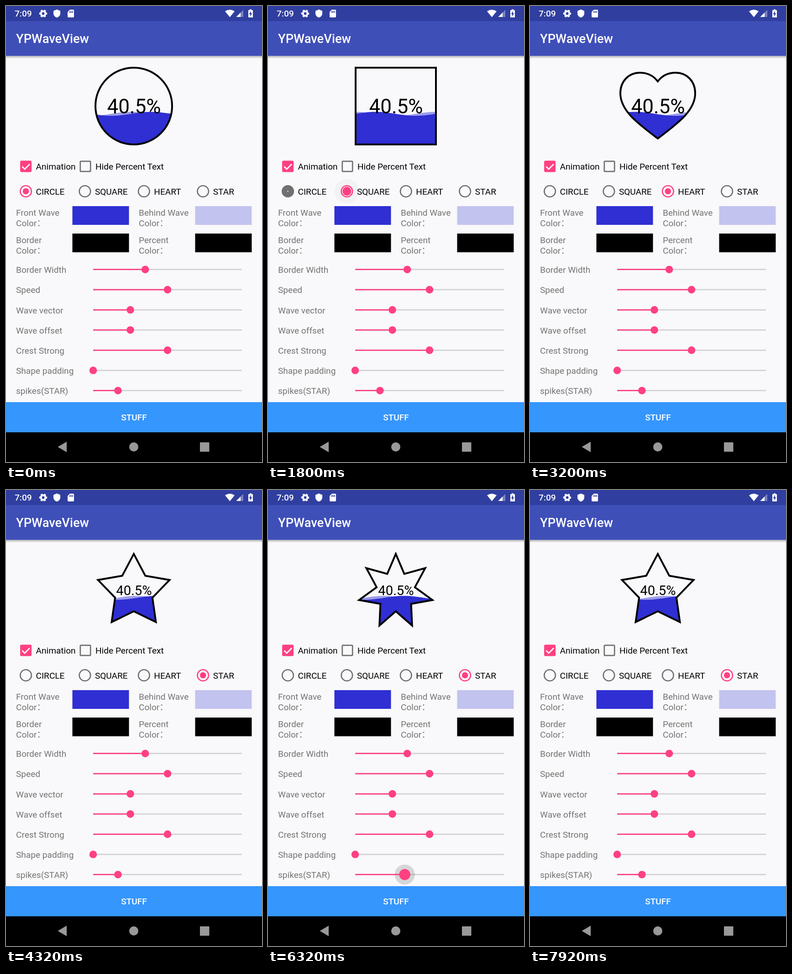
These frames come from a looping animation (561 by 998 pixels, 8000 ms). An HTML page:

```html
<!DOCTYPE html>
<html lang="zh-CN">
<head>
<meta charset="utf-8">
<title>YPWaveView</title>
<style>
  html, body { margin: 0; width: 100%; height: 100%; overflow: hidden; background: #f9f9fb; }
  svg { display: block; width: 100%; height: 100%; }
  text { font: 19.1px Roboto, "Noto Sans CJK SC", "Noto Sans CJK", sans-serif; }
  .medium { font-weight: 500; fill: #fff; }
  .label { fill: #747474; }
</style>
</head>
<body>
<svg id="stage" viewBox="0 0 561 998">
  <defs>
    <linearGradient id="shadow" x2="0" y2="1">
      <stop stop-opacity=".3"/><stop offset="1" stop-opacity="0"/>
    </linearGradient>
    <clipPath id="clip"><path id="clipShape"/></clipPath>
  </defs>

  <rect y="109" width="561" height="6" fill="url(#shadow)"/>
  <rect y="33" width="561" height="76" fill="#3f4fb8"/>
  <rect width="561" height="33" fill="#303f9f"/>
  <text class="medium" x="19" y="23">7:09</text>
  <text class="medium" x="22" y="81" style="font-size:27.3px">YPWaveView</text>

  <g fill="#fff">
    <g fill="none" stroke="#fff">
      <circle cx="81.5" cy="16.5" r="4.9" stroke-width="4"/>
      <circle cx="81.5" cy="16.5" r="7.4" stroke-width="2.6" stroke-dasharray="4.2 3.55" stroke-dashoffset="2.1"/>
    </g>
    <path d="M111.500 7.500L119 10.800V16C119 20.500 116 24 111.500 25.200C107 24 104 20.500 104 16V10.800Z"/>
    <path fill-rule="evenodd" d="M140 8H147Q149 8 149 10V23Q149 25 147 25H137Q135 25 135 23V13ZM139 11V15H140.700V11ZM142 11V15H143.700V11ZM145 11V15H146.700V11Z"/>
    <path d="M480 11.500Q490.500 4.500 501 11.500L490.500 24.500Z"/>
    <path d="M520 8.500V24H504.500Z" opacity=".35"/>
    <path d="M514 14.500V24H504.500Z"/>
    <path fill-rule="evenodd" d="M534 9V7.300H538V9H541V25H531V9ZM537 11L532.700 18H535.200V23L539.300 16H537Z"/>
  </g>

  <g clip-path="url(#clip)">
    <path id="behind" fill="#9d9de9"/>
    <path id="front" fill="#2f2fd3"/>
  </g>
  <path id="border" fill="none" stroke="#000" stroke-width="4"/>
  <text id="percent" x="280.500" text-anchor="middle">40.5%</text>

  <rect x="31" y="338.500" width="25" height="25" rx="3" fill="#ff4081"/>
  <path d="M35.500 351.500L41 357L52 346" fill="none" stroke="#fff" stroke-width="2.700"/>
  <rect x="162.800" y="339.800" width="22.400" height="22.400" rx="1.500" fill="none" stroke="#707070" stroke-width="2.700"/>
  <text x="65.500" y="358">Animation</text>
  <text x="196" y="358">Hide Percent Text</text>

  <g id="controls"></g>

  <rect y="867" width="561" height="66" fill="#3596fd"/>
  <text class="medium" x="280.500" y="907" text-anchor="middle">STUFF</text>
  <rect y="933" width="561" height="65"/>
  <g fill="#999">
    <path d="M113.500 965L133 953.500V976.500Z"/>
    <circle cx="280" cy="965" r="10"/>
    <rect x="425" y="955" width="20.500" height="20.500" rx="1"/>
  </g>
  <circle id="halo" cy="841.700" r="22" fill="#000"/>
  <path id="spikeTrack" stroke="#ff4081" stroke-width="2.700"/>
  <circle id="spikeThumb" cy="841.700" fill="#ff4081"/>
</svg>

<script>
const PINK = '#ff4081', GRAY = '#707070';
const LOOP = 8000;
const $ = id => document.getElementById(id);
const clamp = x => Math.min(1, Math.max(0, x));
const smooth = x => x * x * (3 - 2 * x);

function add(tag, attrs, text = '') {
  const node = document.createElementNS('http://www.w3.org/2000/svg', tag);
  set(node, attrs);
  node.textContent = text;
  return $('controls').appendChild(node);
}
function set(node, attrs) {
  for (const key in attrs) node.setAttribute(key, attrs[key]);
}

// Colour swatches
[['Front Wave', 22, 438, '#2f2fd3'], ['Behind Wave', 291, 438, '#c3c3ef'],
 ['Border', 22, 498, '#000'], ['Percent', 291, 498, '#000']].forEach(([name, x, y, fill]) => {
  add('text', { class: 'label', x, y: y + 21 }, name);
  add('text', { class: 'label', x, y: y + 43.5 }, 'Color：');
  add('rect', { x: x + 123.5, y, width: 124, height: 41, fill });
});

// Sliders; the last one is drawn per frame
const TRACK_X = 191, TRACK_W = 326;
[['Border Width', .35], ['Speed', .5], ['Wave vector', .25], ['Wave offset', .25],
 ['Crest Strong', .5], ['Shape padding', 0], ['spikes(STAR)']].forEach(([name, value], i) => {
  const y = 576.7 + i * 44.17, x = TRACK_X + TRACK_W * value;
  add('text', { class: 'label', x: 22, y: y + 7.5 }, name);
  add('path', { d: `M${TRACK_X} ${y}h${TRACK_W}`, stroke: '#d2d2d2', 'stroke-width': 2.7 });
  if (value === undefined) return;
  add('path', { d: `M${TRACK_X} ${y}H${x}`, stroke: PINK, 'stroke-width': 2.7 });
  add('circle', { cx: x, cy: y, r: 8.3, fill: PINK });
});

// Radio buttons: each is selected from its tap until the next one
const TAPS = [-1000, 1570, 2730, 3720];
const radios = ['CIRCLE', 'SQUARE', 'HEART', 'STAR'].map((name, i) => {
  const cx = 43.5 + i * 129.4, cy = 405.5;
  add('text', { x: cx + 22, y: 412.5 }, name);
  return {
    ripple: add('circle', { cx, cy, r: 27 }),
    ring: add('circle', { cx, cy, fill: 'none' }),
    dot: add('circle', { cx, cy })
  };
});

function drawRadio({ ripple, ring, dot }, i, t) {
  const on = t >= TAPS[i] && !(t >= TAPS[i + 1]);
  const age = t - (on ? TAPS[i] : TAPS[i + 1] ?? Infinity);
  const fillUp = smooth(clamp(age / 170)), settle = clamp((age - 170) / 300);
  const OUTER = 13.6, HOLE = 10.9, DOT = 6.8;
  let hole = HOLE, radius = 0;
  if (on) {
    if (age < 170) hole = HOLE * (1 - fillUp);
    else radius = DOT + (HOLE - DOT) * (1 - settle) ** 1.6;
  } else if (age >= 0) {
    if (age < 170) radius = DOT + (HOLE - DOT) * fillUp;
    else hole = HOLE * smooth(settle);
  }
  const color = on ? PINK : GRAY;
  set(ring, { r: (OUTER + hole) / 2, 'stroke-width': OUTER - hole, stroke: color });
  set(dot, { r: radius, fill: color });
  set(ripple, { opacity: on ? .12 * clamp(1 - age / 300) : 0 });
}

// Spike count while the last slider is dragged: [time, spikes]
const DRAG = [[4680, 5], [5220, 9], [5400, 11], [5640, 14], [6000, 14], [6160, 11], [6320, 7], [6500, 5]];
function spikesAt(t) {
  const next = DRAG.findIndex(([time]) => time > t);
  if (next < 1) return 5;
  const [t0, a] = DRAG[next - 1], [t1, b] = DRAG[next];
  return Math.round(a + (b - a) * (t - t0) / (t1 - t0));
}

function starPath(spikes) {
  const points = Array.from({ length: spikes * 2 }, (_, i) => {
    const r = i % 2 ? 43 : 82.5, a = i * Math.PI / spikes;
    return `${280 + r * Math.sin(a)} ${222.4 - r * Math.cos(a)}`;
  });
  return `M${points.join('L')}Z`;
}

const SHAPES = [
  'M196 219A84 84 0 0 1 364 219A84 84 0 0 1 196 219Z',
  'M192 135H368V303H192Z',
  'M280 165C271 153 257 146 241 146C216 146 198 165 198 191C198 232 244 262 280 290' +
  'C316 262 362 232 362 191C362 165 344 146 319 146C303 146 289 153 280 165Z'
];

function wavePath(crest) {
  let d = 'M190 310';
  for (let x = 190; x <= 370; x += 2)
    d += `L${x} ${236 - 4.3 * Math.cos((x - crest) / 176 * 2 * Math.PI)}`;
  return d + 'L370 310Z';
}

function draw(t) {
  radios.forEach((radio, i) => drawRadio(radio, i, t));

  const selected = TAPS.filter(tap => tap <= t).length - 1;
  const star = selected === 3, spikes = spikesAt(t);
  const shape = star ? starPath(spikes) : SHAPES[selected];
  set($('clipShape'), { d: shape });
  set($('border'), { d: shape });
  set($('percent'), { y: star ? 229.5 : 234.5, style: `font-size:${star ? 29.2 : 44}px` });

  const crest = 318 + 176 * 1.406 * t / 1000;
  set($('front'), { d: wavePath(crest) });
  set($('behind'), { d: wavePath(crest - 44) });

  const x = TRACK_X + TRACK_W * (spikes - 3) / 12;
  const press = clamp((t - 4540) / 120) * clamp((7120 - t) / 120);
  set($('spikeTrack'), { d: `M${TRACK_X} 841.700H${x}` });
  set($('spikeThumb'), { cx: x, r: 8.3 + 3.9 * press });
  set($('halo'), { cx: x, opacity: .14 * press });
}

const start = performance.now();
function tick() {
  draw((performance.now() - start) % LOOP);
  requestAnimationFrame(tick);
}
tick();
</script>
</body>
</html>
```
